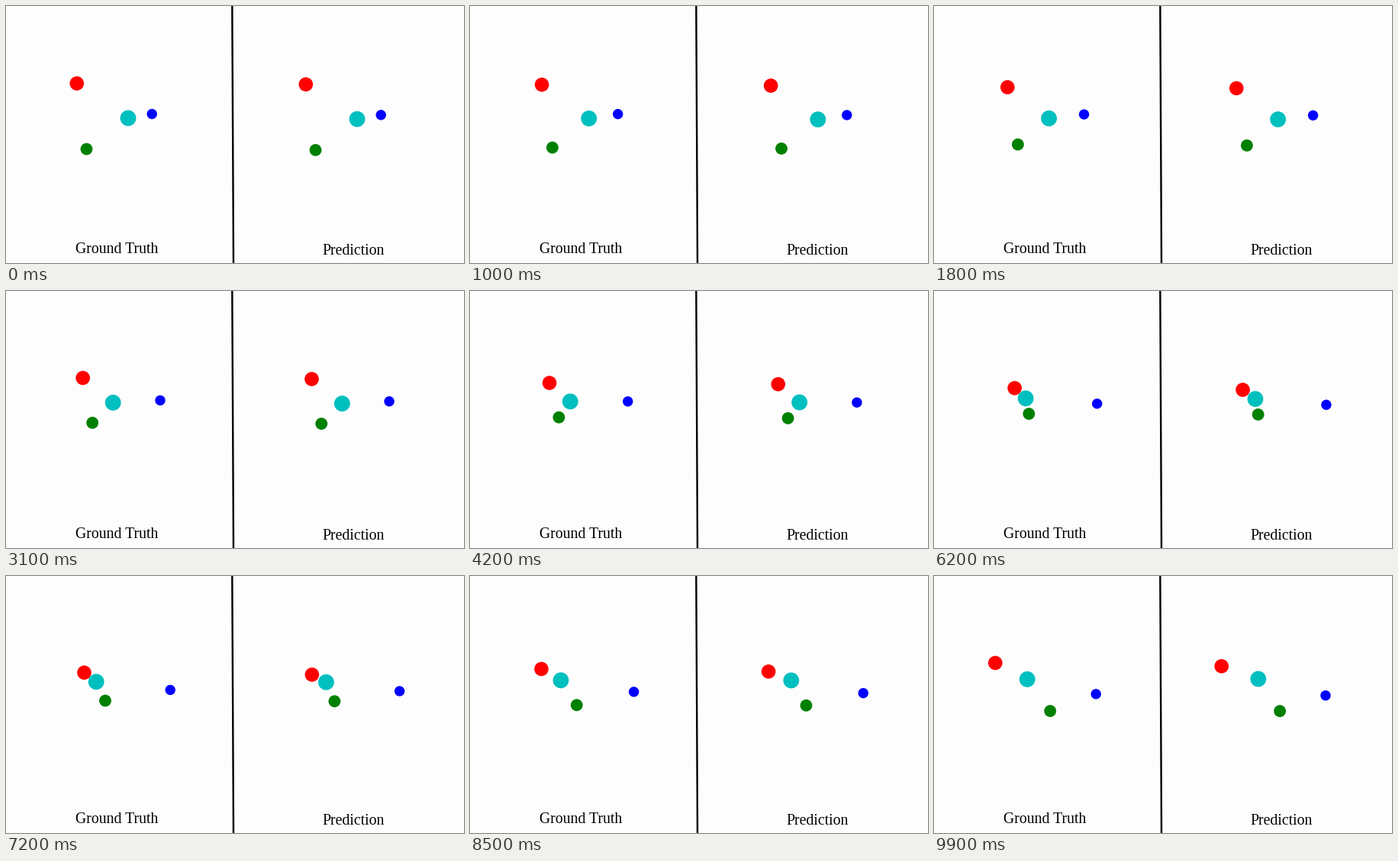
These frames come from a looping animation (600x337 px, 10 s). A matplotlib script:

```python
import numpy as np
import matplotlib.pyplot as plt
from matplotlib.animation import FuncAnimation
from matplotlib.patches import Circle

W, H, DPI = 600, 337, 100
FRAMES, STEP = 100, 100
PT = 72 / DPI
BG = "#fdfdfe"
SHIFT = np.array([300, 1.3])  # offset from the true panel to the predicted one

# Moments (s) of the key points: start, approach, closest pass, parting, end.
KEYS = np.array([0, 3.1, 5.3, 7.2, 9.9])
KNOTS = KEYS[2:4]

# colour, radius, key points, final prediction error
BODIES = [
    ("#ff0000", 9.3, [(92.8, 101.5), (100.7, 114), (106, 125.5),
                      (102.5, 126.7), (80.3, 114)], (-3.6, 3)),
    ("#008000", 7.9, [(105.5, 187.6), (113.2, 172.8), (120.4, 161.3),
                      (130, 163.5), (152.2, 177)], (0.9, -1.2)),
    ("#00bfbf", 10.4, [(160, 147), (140.2, 146.4), (124, 142.8),
                       (118.2, 138.7), (122.2, 135.4)], (2.6, -1.7)),
    ("#0000ff", 6.7, [(191.2, 141.6), (202, 143.4), (211, 146.4),
                      (215.2, 149.4), (212.2, 154.8)], (0.8, 0.6)),
]


def basis(t):
    """Cubic spline terms at times t."""
    t = t[:, None]
    return np.hstack([t ** np.arange(4), np.clip(t - KNOTS, 0, None) ** 3])


def orbit(points, t):
    """Smooth path through the key points that ends in free flight."""
    end = KEYS[-1]
    coasting = np.array([0, 0, 2, 6 * end, *(6 * (end - KNOTS))])
    system = np.vstack([basis(KEYS), coasting])
    return basis(t) @ np.linalg.solve(system, np.vstack([points, [0, 0]]))


def drift(error, t):
    """Prediction error, which grows with time."""
    return np.outer((t / KEYS[-1]) ** 2.5, error)


fig = plt.figure(figsize=(W / DPI, H / DPI), dpi=DPI, facecolor=BG)
ax = fig.add_axes([0, 0, 1, 1])
ax.set(xlim=(0, W), ylim=(H, 0))
ax.axis("off")

ax.plot([296.3, 298], [-2, H + 2], color="black", lw=2.4 * PT)
for x, y, label in [(145.2, 324.5, "Ground Truth"), (455.3, 325.5, "Prediction")]:
    ax.text(x, y, label, family="Liberation Serif", size=19.8 * PT,
            ha="center", va="baseline", color="black")

times = np.arange(FRAMES) * STEP / 1000
dots = []
for color, radius, points, error in BODIES:
    truth = orbit(points, times)
    for path in (truth, truth + SHIFT + drift(error, times)):
        dot = ax.add_patch(Circle(path[0], radius, fc=color, lw=0, zorder=3))
        dots.append((dot, path))


def update(i):
    for dot, path in dots:
        dot.center = path[i]
    return [dot for dot, _ in dots]


anim = FuncAnimation(fig, update, frames=FRAMES, interval=STEP,
                     repeat=True, repeat_delay=0)
plt.show()
```
